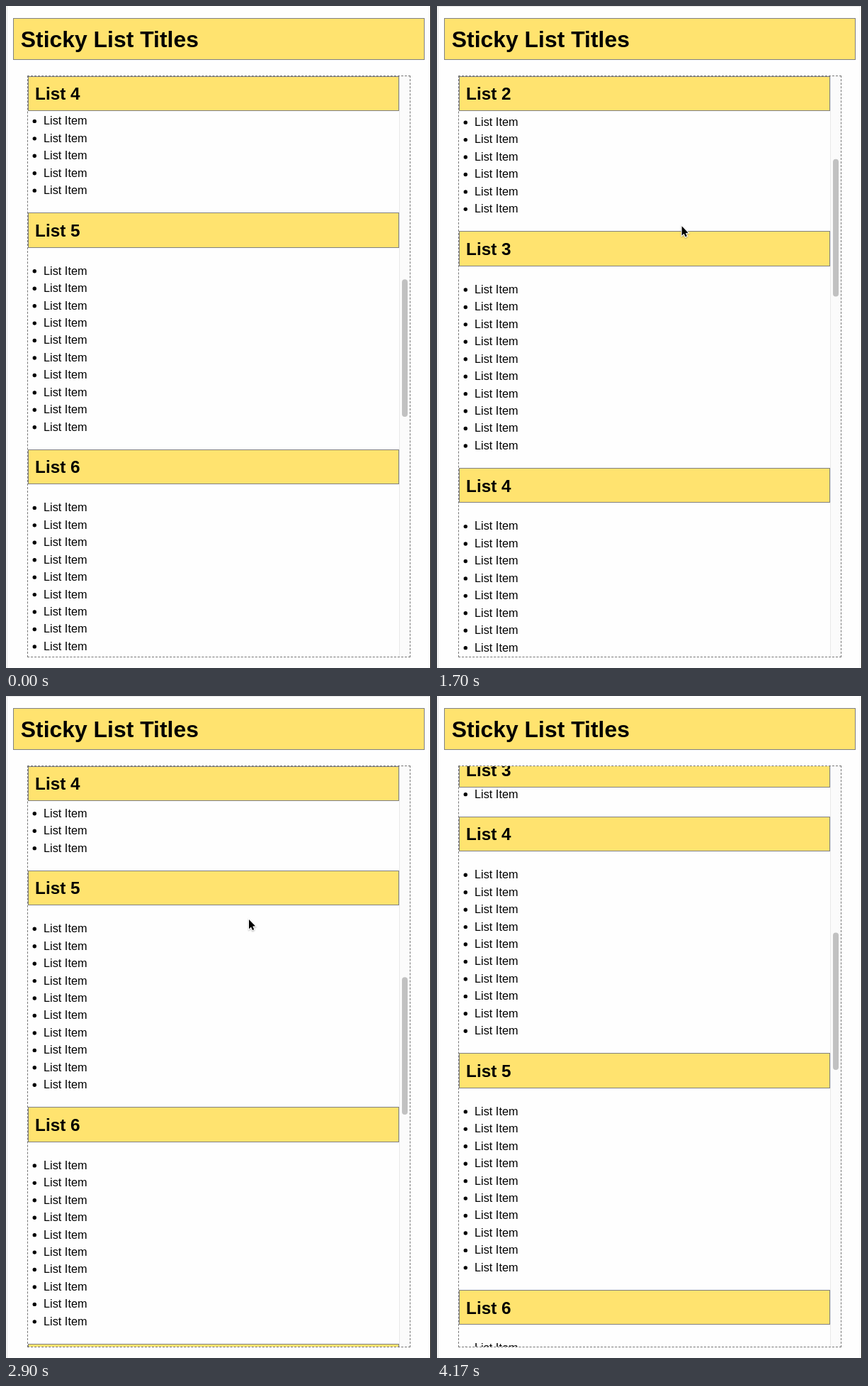
An HTML page with a canvas for the animation above (4.33 s loop, 600 by 933 pixels).

```html
<!DOCTYPE html>
<html lang="en">
<head>
<meta charset="utf-8">
<title>Sticky List Titles</title>
<style>
  html, body { margin: 0; width: 100%; height: 100%; overflow: hidden; background: #fefefe; }
  canvas { display: block; }
</style>
</head>
<body>
<canvas id="stage" width="600" height="933"></canvas>
<script>
const ctx = document.getElementById('stage').getContext('2d');
const LOOP = 4330, STEP = 100;
const FONT = '"Liberation Sans", Arial, sans-serif';
const YELLOW = '#ffe36f', GRAY = '#808080';

const VIEW = { left: 31, top: 99, right: 570, bottom: 917 };
const PERIOD = 333.6, HEAD_H = 49.1, LINE = 24.44;
const STICK_Y = 99.3, PUSH_GAP = 41;
const LISTS = 10, ITEMS = 10;

// Scroll gestures move the top of the first list; a higher decay brakes earlier.
const START_TOP = -1042.4;
const glides = [
  { from: 0, until: 600, to: 119.3, decay: 1 },
  { from: 818, until: 1800, to: -363, decay: 1 },
  { from: 1900, until: 2900, to: -1087.9, decay: 2.25 },
  { from: 2933, until: 3700, to: -830.3, decay: 2.25 }
];

const ramp = (t, from, until) => Math.min(1, Math.max(0, (t - from) / (until - from)));
const smooth = u => u * u * (3 - 2 * u);

function firstTop(t) {
  return glides.reduce((y, g) => {
    const u = ramp(t, g.from, g.until);
    return y + (g.to - y) * smooth(1 - (1 - u) ** g.decay);
  }, START_TOP);
}

function text(str, x, y, size, weight = 'normal') {
  ctx.font = `${weight} ${size}px ${FONT}`;
  ctx.fillStyle = '#000';
  ctx.fillText(str, x, y);
}

function panel(x, y, w, h) {
  ctx.fillStyle = GRAY;
  ctx.fillRect(x, y, w, h);
  ctx.fillStyle = YELLOW;
  ctx.fillRect(x + 1, y + 1, w - 2, h - 2);
}

function drawItems(top) {
  for (let i = 0; i < ITEMS; i++) {
    const y = top + 81 + i * LINE;
    ctx.fillStyle = '#000';
    ctx.beginPath();
    ctx.arc(40.3, y + 0.8, 2.7, 0, Math.PI * 2);
    ctx.fill();
    text('List Item', 53, y + 5.7, 16.3);
  }
}

function drawHead(n, top) {
  const pushed = top + PERIOD - PUSH_GAP - HEAD_H;
  const y = Math.max(top, Math.min(STICK_Y, pushed));
  const edge = Math.floor(y - 0.3);
  panel(31, edge, 524, Math.floor(y + HEAD_H) - edge);
  text('List ' + n, 41.1, y + 32.8, 24.3, 'bold');
}

function drawScrollbar(first) {
  ctx.fillStyle = '#fbfbfb';
  ctx.fillRect(555, 98, 15, 820);
  ctx.fillStyle = '#e8e8e8';
  ctx.fillRect(555, 98, 1, 820);
  ctx.fillStyle = '#c1c1c1';
  ctx.beginPath();
  ctx.roundRect(559, 125 + (22.4 - first) * 0.2444, 8, 193.7, 4);
  ctx.fill();
}

// A dash ends on each corner, so the gap is fitted to the side.
function dashedSide(x0, y0, x1, y1) {
  const length = Math.hypot(x1 - x0, y1 - y0), dash = 3.05;
  const count = Math.round((length + 2) / (dash + 2));
  ctx.setLineDash([dash, (length - count * dash) / (count - 1)]);
  ctx.beginPath();
  ctx.moveTo(x0, y0);
  ctx.lineTo(x1, y1);
  ctx.stroke();
}

function drawFrame() {
  ctx.strokeStyle = '#777';
  ctx.lineWidth = 1;
  dashedSide(30, 98.5, 571, 98.5);
  dashedSide(30, 917.5, 571, 917.5);
  dashedSide(30.5, 98, 30.5, 918);
  dashedSide(570.5, 98, 570.5, 918);
  ctx.setLineDash([]);
}

function drawPointer(t) {
  const drift = ramp(t, 1100, 2900), back = ramp(t, 2900, 3300);
  ctx.save();
  ctx.translate(347 - 4 * drift, 308 + 7 * (drift - back));
  const arrow = new Path2D('M0 0V13.2L3 10.5 5 15 7.2 14 5.2 9.6 9 9.3Z');
  ctx.shadowColor = 'rgba(0,0,0,0.3)';
  ctx.shadowBlur = 2;
  ctx.shadowOffsetY = 1;
  ctx.strokeStyle = '#fff';
  ctx.lineWidth = 2;
  ctx.stroke(arrow);
  ctx.shadowColor = 'transparent';
  ctx.fillStyle = '#000';
  ctx.fill(arrow);
  ctx.restore();
}

function draw(time) {
  const t = Math.floor((time % LOOP) / STEP) * STEP;
  const first = firstTop(t);
  const pointing = t >= 100 && t < 3700;

  ctx.fillStyle = '#fefefe';
  ctx.fillRect(0, 0, 600, 933);
  ctx.fillStyle = '#e4e4e4';
  ctx.fillRect(1, 0, 1, 933);
  if (pointing) ctx.fillRect(0, 0, 600, 1);
  ctx.fillStyle = '#000';
  ctx.fillRect(599, 0, 1, 933);

  panel(10, 17, 581, 59);
  text('Sticky List Titles', 20.8, 58.4, 31.9, 'bold');

  ctx.save();
  ctx.beginPath();
  ctx.rect(VIEW.left, VIEW.top, VIEW.right - VIEW.left, VIEW.bottom - VIEW.top);
  ctx.clip();
  for (let n = 0; n < LISTS; n++) drawItems(first + n * PERIOD);
  for (let n = 0; n < LISTS; n++) drawHead(n + 1, first + n * PERIOD);
  drawScrollbar(first);
  ctx.restore();

  drawFrame();
  if (pointing) drawPointer(t);
}

const start = performance.now();
function tick() {
  draw(performance.now() - start);
  requestAnimationFrame(tick);
}
tick();
</script>
</body>
</html>
```
